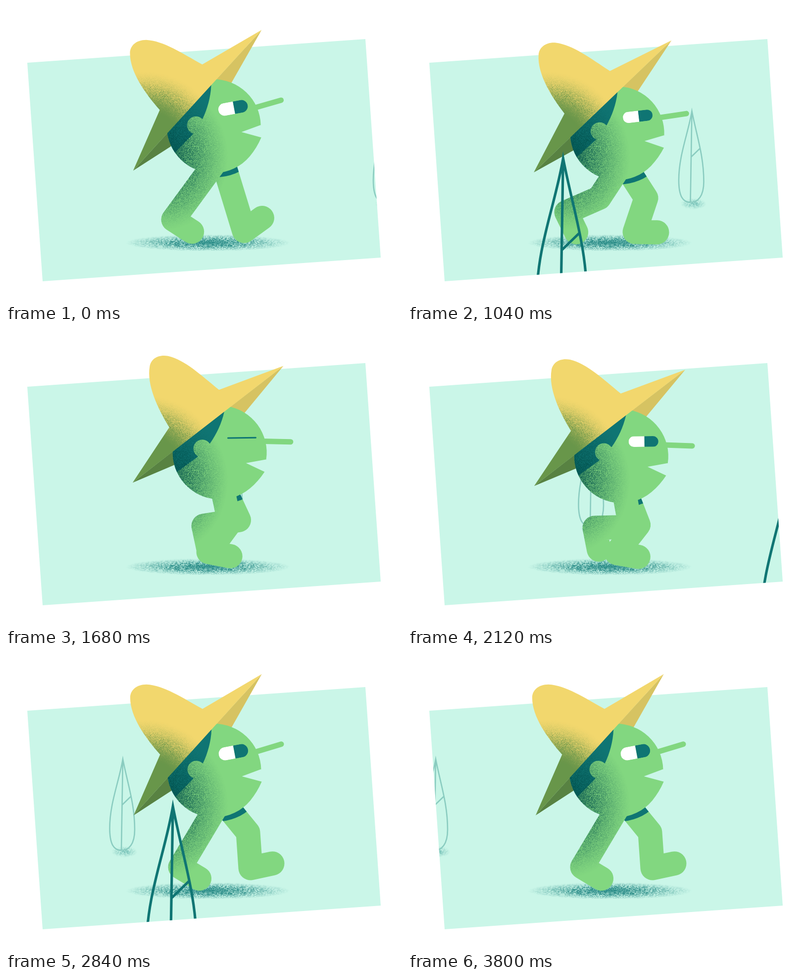
Write an HTML page with a canvas that moves like this. It is 800 px wide and 600 px high and loops after 3.84 s.

```html
<!DOCTYPE html>
<html>
<head>
<meta charset="utf-8">
<title>Walking farmer</title>
<style>
  html, body { margin: 0; width: 100%; height: 100%; overflow: hidden; background: #fff; }
  canvas { display: block; }
</style>
</head>
<body>
<canvas id="stage" width="800" height="600"></canvas>
<script>
const W = 800, H = 600, FRAME_MS = 40, FRAMES = 96, STRIDE = 24;
const SKIN = '#82d780', TEAL = '#0f7573', STRAW = '#f2d76d', MINT = '#caf6e8', HAZE = '#8accc0';
const HEAD = { x: 419, y: 245, r: 95 };
const THIGH = 87, SHIN = 72.5, FOOT = 45, LEG_WIDTH = 49;

// phase, ankle x, ankle y, foot angle in degrees
const GAIT = [
  [0, 338, 433, 33], [1, 330, 428, 40], [2, 320, 418, 64], [5, 377, 401, 79],
  [6, 399, 397, 78], [8.5, 460, 398, 45], [11, 494, 434, -12], [12, 481, 456, -36],
  [13, 470, 458, 0], [14, 458, 458, 1], [17, 421, 452, 10], [18, 409, 450, 11], [23, 352, 432, 31]
];

let seed = 7;
const random = () => (seed = (seed * 16807) % 2147483647) / 2147483647;
const rad = degrees => degrees * Math.PI / 180;
const clamp01 = v => Math.max(0, Math.min(1, v));
const wave = (k, peak) => Math.cos((k - peak) * Math.PI / 6);

function layer() {
  const canvas = document.createElement('canvas');
  canvas.width = W;
  canvas.height = H;
  return canvas.getContext('2d');
}

// Speckled texture; coverage(x, y) gives the mean opacity.
function grain(color, cell, [x0, y0, x1, y1], coverage) {
  const g = layer();
  g.fillStyle = color;
  for (let y = y0; y < y1; y += cell) {
    for (let x = x0; x < x1; x += cell) {
      const p = clamp01(coverage(x, y));
      if (!p) continue;
      const spread = 1.6 * Math.min(p, 1 - p);
      g.globalAlpha = clamp01(p + (random() - .5) * spread);
      g.fillRect(x, y, cell, cell);
    }
  }
  return g.canvas;
}

const bodyShade = grain('#004f4b', 1, [170, 170, 460, 480],
  (x, y) => .95 * clamp01(1 - Math.hypot(x - 318, (y - 306) * .88) / 130) ** 1.2);
const hatShade = grain('#68964a', 1, [110, 110, 460, 460], (x, y) => {
  const t = clamp01((160 - Math.hypot(x - 280, y - 290)) / 87);
  return t * t * (3 - 2 * t);
});
const groundShade = grain('#1f8581', 2, [240, 460, 576, 500],
  (x, y) => .92 * (1 - Math.hypot((x - 407) / 166, (y - 479) / 17)));
const treeShade = grain('#5fb3aa', 2, [370, 388, 430, 412],
  (x, y) => .6 * (1 - Math.hypot((x - 400) / 26, (y - 400) / 11)));

const stage = document.getElementById('stage').getContext('2d');
const buffer = layer();

function polygon(g, points, fill) {
  g.beginPath();
  points.forEach(([x, y]) => g.lineTo(x, y));
  g.closePath();
  if (fill) {
    g.fillStyle = fill;
    g.fill();
  }
}

function fillPath(g, d, color) {
  g.fillStyle = color;
  g.fill(new Path2D(d));
}

function line(g, x0, y0, x1, y1, width, color) {
  g.lineWidth = width;
  g.strokeStyle = color;
  g.beginPath();
  g.moveTo(x0, y0);
  g.lineTo(x1, y1);
  g.stroke();
}

// Draws into the buffer, speckles it, then puts it on the stage.
function shaded(texture, draw) {
  buffer.clearRect(0, 0, W, H);
  draw(buffer);
  buffer.globalCompositeOperation = 'source-atop';
  buffer.drawImage(texture, 0, 0);
  buffer.globalCompositeOperation = 'source-over';
  stage.drawImage(buffer.canvas, 0, 0);
}

// Smooth interpolation of the cyclic gait keys.
function gaitAt(phase) {
  const n = GAIT.length;
  const key = i => {
    const turn = Math.floor(i / n), [t, ...pose] = GAIT[i - turn * n];
    return [t + turn * STRIDE, ...pose];
  };
  const p = phase % STRIDE;
  let i = 0;
  while (key(i + 1)[0] <= p) i++;
  const [a, b, c, d] = [key(i - 1), key(i), key(i + 1), key(i + 2)];
  const span = c[0] - b[0], u = (p - b[0]) / span;
  return [1, 2, 3].map(j => {
    const m0 = (c[j] - a[j]) / (c[0] - a[0]) * span;
    const m1 = (d[j] - b[j]) / (d[0] - b[0]) * span;
    return (2 * u ** 3 - 3 * u * u + 1) * b[j] + (u ** 3 - 2 * u * u + u) * m0
      + (3 * u * u - 2 * u ** 3) * c[j] + (u ** 3 - u * u) * m1;
  });
}

function legPath(phase, hip) {
  const [ax, ay, angle] = gaitAt(phase);
  const dx = ax - hip.x, dy = ay - hip.y;
  const reach = Math.min(Math.hypot(dx, dy), THIGH + SHIN);
  const bend = Math.acos(Math.min(1, (THIGH ** 2 + reach ** 2 - SHIN ** 2) / (2 * THIGH * reach)));
  const aim = Math.atan2(dy, dx) - bend;
  const path = new Path2D();
  path.moveTo(hip.x, hip.y);
  path.lineTo(hip.x + THIGH * Math.cos(aim), hip.y + THIGH * Math.sin(aim));
  path.lineTo(ax, ay);
  path.lineTo(ax + FOOT * Math.cos(rad(angle)), ay + FOOT * Math.sin(rad(angle)));
  return path;
}

function strokeLeg(g, path, color) {
  g.lineWidth = LEG_WIDTH;
  g.lineCap = g.lineJoin = 'round';
  g.strokeStyle = color;
  g.stroke(path);
}

function inHead(g, pose, draw) {
  g.save();
  g.translate(pose.x, pose.y);
  g.rotate(rad(pose.tilt));
  g.translate(-HEAD.x, -HEAD.y);
  draw(g);
  g.restore();
}

function drawHead(g) {
  g.beginPath();
  g.moveTo(475, 257);
  g.lineTo(513, 243);
  g.arc(HEAD.x, HEAD.y, HEAD.r, -.02, .7, true);
  g.quadraticCurveTo(506, 289, 515, 268);
  g.closePath();
  g.fillStyle = SKIN;
  g.fill();
  g.save();
  g.clip();
  fillPath(g, 'M414 150V162C413 186 406 210 397 229L376 262L340 299L300 310V150Z', TEAL);
  g.restore();
  g.fillStyle = SKIN;
  g.beginPath();
  g.arc(383, 243, 18, 0, 7);
  g.fill();
}

function drawFace(g, pose) {
  g.lineCap = 'round';
  g.save();
  g.translate(505, 207);
  g.rotate(rad(pose.nose - pose.tilt));
  line(g, -4, 0, 52, 0, 11, SKIN);
  g.restore();

  g.translate(458, 208);
  g.rotate(rad(-10.5));
  const r = pose.eye;
  if (r < 3) {
    line(g, -28, 0, 28, 0, 3, TEAL);
    return;
  }
  g.beginPath();
  g.roundRect(-30, -r, 60, 2 * r, r);
  g.clip();
  g.fillStyle = '#fff';
  g.fillRect(-30, -r, 32, 2 * r);
  g.fillStyle = TEAL;
  g.fillRect(2, -r, 30, 2 * r);
}

function drawBrimUnderside(g) {
  polygon(g, [[516, 50], [455, 157], [393, 222], [386, 192]], '#d6c362');
  polygon(g, [[256, 335], [332, 286], [393, 222], [386, 192]], '#588242');
}

function drawHat(g) {
  fillPath(g, 'M516 50L396 120C355 97 318 72 283 70C262 70 250 82 250 97' +
    'C250 135 280 178 310 212L256 335Z', STRAW);
}

function drawTree(x, y, scale, color) {
  stage.save();
  stage.translate(x, y);
  stage.scale(scale, scale);
  stage.strokeStyle = color;
  stage.lineWidth = 2.6;
  stage.stroke(new Path2D('M0 5C-8 52-26.5 95-26.5 145C-26.5 178-18 190-3 190C12 190 24 178 24 148' +
    'C24 95 10 57 0 5ZL-3 190M-1.5 98L17 80'));
  stage.restore();
}

function render(frame) {
  const k = frame % 12;
  const pose = {
    x: 425.7 - 6 * wave(k, 0),
    y: 246 + 15.5 * wave(k, 3.3),
    tilt: 4.85 - 5.2 * wave(k, 11.4),
    nose: -7.5 - 9.5 * wave(k, 11.2),
    eye: (12.1 - 1.5 * wave(k, 4)) * Math.min(1, Math.abs(frame - 42) / 3)
  };
  const hip = { x: 434, y: pose.y + 58 };
  const near = legPath(frame, hip), far = legPath(frame + STRIDE / 2, hip);

  stage.fillStyle = '#fff';
  stage.fillRect(0, 0, W, H);
  stage.save();
  polygon(stage, [[43, 115], [726, 67], [757, 510], [74, 558]], MINT);
  stage.clip();
  const treeX = 768.5 - 7.5 * frame;
  stage.drawImage(treeShade, treeX - 398, 0);
  drawTree(treeX, 208, 1, HAZE);
  stage.drawImage(groundShade, 0, 0);
  stage.restore();

  inHead(stage, pose, drawBrimUnderside);
  shaded(bodyShade, g => {
    strokeLeg(g, far, SKIN);
    g.save();
    g.beginPath();
    g.arc(pose.x + 5, pose.y + 2, 101.5, 0, 7);
    g.clip();
    strokeLeg(g, far, TEAL);
    g.restore();
    strokeLeg(g, near, SKIN);
    inHead(g, pose, drawHead);
  });
  inHead(stage, pose, g => drawFace(g, pose));
  shaded(hatShade, g => inHead(g, pose, drawHat));

  stage.save();
  polygon(stage, [[43, 115], [726, 67], [757, 510], [74, 558]]);
  stage.clip();
  for (const start of [933.5, 2030.5]) drawTree(start - 23.85 * frame, 299, 2, TEAL);
  stage.restore();
}

const startTime = performance.now();
function tick() {
  render(Math.floor((performance.now() - startTime) / FRAME_MS) % FRAMES);
  requestAnimationFrame(tick);
}
tick();
</script>
</body>
</html>
```
